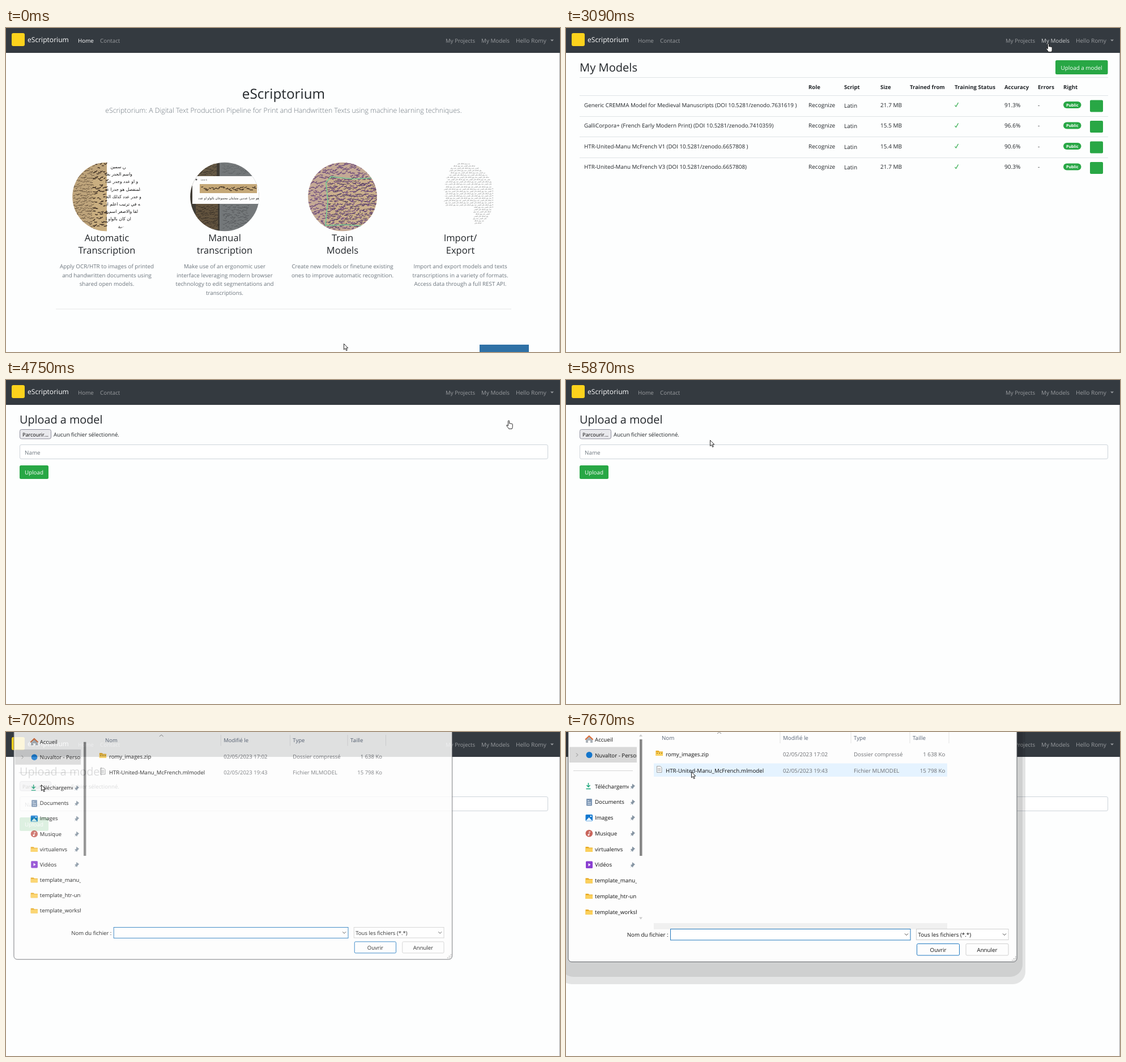
An HTML page that plays this animation: 978x573 px, repeating every 8 s.

```html
<!DOCTYPE html>
<html lang="en">
<head>
<meta charset="utf-8">
<title>Model upload</title>
<style>
html, body { margin: 0; width: 100%; height: 100%; overflow: hidden; background: #fdfefe; }
svg { display: block; width: 978px; height: 573px; font-family: "Open Sans", "Noto Sans", sans-serif; font-size: 9.85px; }
text { white-space: pre; text-rendering: geometricPrecision; }
.ar { font-family: "DejaVu Sans", sans-serif; }
.hide { display: none; }
</style>
</head>
<body>
<svg id="stage" viewBox="0 0 978 573"></svg>
<script>
const INK = '#212529', MUTED = '#6c757d', GREEN = '#28a745', LINK = '#999c9f';

// Markup helpers
const attrs = o => Object.entries(o).map(([k, v]) => `${k}="${v}"`).join(' ');
const text = (x, y, s, o = {}) => `<text x="${x}" y="${y}" ${attrs({ fill: INK, ...o })}>${s}</text>`;
const mid = (x, y, s, o = {}) => text(x, y, s, { 'text-anchor': 'middle', ...o });
const end = (x, y, s, o = {}) => text(x, y, s, { 'text-anchor': 'end', ...o });
const box = (x, y, w, h, fill, o = {}) => `<rect ${attrs({ x, y, width: w, height: h, fill, ...o })}/>`;
const path = (d, o = {}) => `<path ${attrs({ d, fill: 'none', ...o })}/>`;
const dot = (cx, cy, r, fill) => `<circle ${attrs({ cx, cy, r, fill })}/>`;
const group = (body, o = {}) => `<g ${attrs(o)}>${body}</g>`;
const range = n => [...Array(n).keys()];

function randomFrom(seed) {
  return () => (seed = (seed * 16807) % 2147483647) / 2147483647;
}

// Rows of small pen strokes that read as handwriting
function script(x, y, w, h, gap, color, seed, weight = 1) {
  const rnd = randomFrom(seed);
  let d = '';
  for (let row = y; row < y + h; row += gap)
    for (let px = x; px < x + w; px += 2 + rnd() * 3) {
      const dy = (rnd() - .5) * gap * .8;
      d += `M${px.toFixed(1)} ${(row + dy).toFixed(1)}q${(rnd() * 3).toFixed(1)} ${(rnd() * 4 - 1).toFixed(1)} ${(2 + rnd() * 3).toFixed(1)} ${(rnd() * 3 - 2).toFixed(1)}`;
    }
  return path(d, { stroke: color, 'stroke-width': weight, 'stroke-linecap': 'round' });
}

function navbar() {
  return box(0, 0, 978, 44, '#343a40') + box(10, 9, 23, 23, '#fcd21c', { rx: 3 }) +
    text(38, 25, 'eScriptorium', { fill: '#fff', 'font-size': 12.1 }) +
    text(127, 25.5, 'Home', { fill: LINK, id: 'homeLink' }) +
    text(166, 25.5, 'Contact', { fill: LINK }) +
    text(776, 25.5, 'My Projects', { fill: LINK, 'font-size': 9.7 }) +
    text(839, 25.5, 'My Models', { fill: LINK, id: 'modelsLink' }) +
    text(900, 25.5, 'Hello Romy', { fill: LINK, 'font-size': 10.1 }) +
    path('M961 20.5h6l-3 3z', { fill: LINK });
}

const PHRASES = ['بيه فن سمين', 'واسم الجدر بعد', 'واو او عدد وجدر عدد كذلك الجدر', 'المنفصل هو جدرا عددين مس',
  'و جدر عدد كذلك الجدر ثلاثة', 'يه في ترتيب اعلم ان دوات', 'نطقا والاصغر اسم فان كان ج', 'الاول ان كان بالواو الجدر', 'الاحدر خمسة'];

function pictures() {
  const first = box(117, 237, 61, 123, '#bea47b') + box(178, 237, 62, 123, '#fff') +
    box(152, 262, 26, 98, '#c9ae80') + script(119, 241, 34, 118, 6, '#5b4936', 11, .9) +
    script(154, 243, 23, 112, 12, '#3c2d22', 5, 1.4) +
    group(PHRASES.map((s, i) => text(i < 2 ? 226 - i * 3 : 239, 248 + i * 13.2, s,
      { class: 'ar', 'font-size': 7.6, fill: '#111', direction: 'rtl' })).join(''), { 'clip-path': 'url(#rightHalf)' });

  const second = box(325, 237, 52, 123, '#403c35') + box(377, 237, 70, 123, '#74787a') +
    box(340, 240, 32, 24, '#675a46') + box(335, 311, 39, 45, '#62533e') +
    script(336, 316, 36, 38, 5, '#302a24', 7, .8) + script(342, 244, 28, 17, 5, '#39332b', 9, .8) +
    script(382, 244, 50, 16, 6, '#5b5f61', 15, .7) + script(383, 316, 45, 38, 6, '#4d5052', 25, .8) +
    box(329, 262, 118, 49, '#fdfdfd') + box(342, 276, 101, 16, '#c5a878') +
    script(345, 284, 94, 6, 7, '#392b20', 31, 1.2) + dot(336, 268, 1.6, '#555') +
    text(344, 270, 'Line 6', { 'font-size': 4, fill: '#555' }) +
    mid(393, 303, 'هو جدرا عددين متباينان محموعان بالواو او عدد', { class: 'ar', 'font-size': 5.6, fill: '#222' });

  const third = box(533, 237, 122, 123, '#c4a995') + box(566, 265, 89, 84, '#cbb08c') +
    script(534, 241, 120, 119, 8, '#73527f', 43, 1.5) + script(568, 268, 84, 82, 9, '#50405a', 47, 1) +
    path('M652 265L612 267 574 263 565 273 568 306 564 349 600 348 646 351', { stroke: '#78c895', 'stroke-width': 1.7 });

  const fourth = range(27).map(i => {
    const y = 241 + i * 4.05, u = (y - 298) / 61, half = 61 * Math.sqrt(1 - u * u);
    const right = 802 + Math.min(half, 55) - (i < 4 ? 4 : 0);
    const left = i > 18 ? 819 + i % 3 * 3 : 802 - half * .64;
    const words = Math.max(2, Math.round((right - left) / 7.1));
    const line = range(words).map(k => ['عدد', 'كذلك', 'الجدر', 'واو', 'فان'][(k * 3 + i) % 5]).join(' ');
    return text(right, y, line, { class: 'ar', 'font-size': 3.1, fill: '#666', direction: 'rtl' }) +
      (i > 10 && i < 20 ? box(858.5, y - 2, 1.5, 1.5, '#aaa') : '');
  }).join('');

  return [first, second, third, fourth].map((p, i) => group(p, { 'clip-path': `url(#c${i})` })).join('');
}

function home() {
  const columns = [
    ['Automatic', 'Transcription', 'Apply OCR/HTR to images of printed', 'and handwritten documents using', 'shared open models.'],
    ['Manual', 'transcription', 'Make use of an ergonomic user', 'interface leveraging modern browser', 'technology to edit segmentations and', 'transcriptions.'],
    ['Train', 'Models', 'Create new models or finetune existing', 'ones to improve automatic recognition.'],
    ['Import/', 'Export', 'Import and export models and texts', 'transcriptions in a variety of formats.', 'Access data through a full REST API.']];
  return mid(490, 125, 'eScriptorium', { 'font-size': 24.3 }) +
    mid(490, 150, 'eScriptorium: A Digital Text Production Pipeline for Print and Handwritten Texts using machine learning techniques.',
      { 'font-size': 12.25, 'font-weight': 300, fill: MUTED }) +
    pictures() +
    columns.map((lines, c) => lines.map((s, i) => i < 2
      ? mid(178 + c * 208, 377 + i * 22, s, { 'font-size': 16.5 })
      : mid(178 + c * 208, 425 + (i - 2) * 15.7, s, { fill: MUTED })).join('')).join('') +
    box(88, 496.5, 804, 1, '#e6e7e7') + box(836, 560, 87, 13, '#2f71a6');
}

function models() {
  const heads = [[428, 'Role'], [491, 'Script'], [555, 'Size'], [607, 'Trained from'], [686, 'Training Status'],
    [774, 'Accuracy'], [833, 'Errors'], [878, 'Right']];
  const rows = [
    ['Generic CREMMA Model for Medieval Manuscripts (DOI 10.5281/zenodo.7631619 )', '21.7 MB', '91.3%'],
    ['GalliCorpora+ (French Early Modern Print) (DOI 10.5281/zenodo.7410359)', '15.5 MB', '96.6%'],
    ['HTR-United-Manu McFrench V1 (DOI 10.5281/zenodo.6657808 )', '15.4 MB', '90.6%'],
    ['HTR-United-Manu McFrench V3 (DOI 10.5281/zenodo.6657808)', '21.7 MB', '90.3%']];
  const cell = { 'font-size': 10.05 };
  const icons = range(4).map(i => {
    const y = 132 + i * 36.5;
    return path(`M935.5 ${y}h3v4h3l-4.5 4.5-4.5-4.5h3zM931 ${y + 8.5}h3l3 2 3-2h3v3.5h-12z`, { fill: '#fff' });
  }).join('');
  return text(24, 77, 'My Models', { 'font-size': 20.1 }) +
    box(864, 57, 92.5, 25, GREEN, { rx: 2.5, id: 'uploadBtn' }) +
    mid(910, 73.5, 'Upload a model', { fill: '#fff' }) +
    [87, 119, 156, 192, 229].map(y => box(24, y, 933, 1, '#dfe3e6')).join('') +
    heads.map(([x, s]) => text(x, 107.5, s, { 'font-weight': 700, 'font-size': 9.6 })).join('') +
    rows.map(([name, size, score], i) => {
      const y = 139.5 + i * 36.5;
      return text(32, y, name, { 'font-size': 9.8 }) + text(428, y, 'Recognize', cell) + text(491, y + 1, 'Latin', cell) +
        text(555, y, size, cell) + path(`M686.5 ${y - 3}l2 2.5 4-7`, { stroke: GREEN, 'stroke-width': 1.2 }) +
        text(774, y, score, cell) + text(833, y, '-', cell) +
        box(878, y - 9.5, 31.5, 12, GREEN, { rx: 6 }) +
        mid(893.8, y - .8, 'Public', { fill: '#fff', 'font-weight': 700, 'font-size': 7.1 }) +
        box(925, y - 12, 23, 21, GREEN, { rx: 2 });
    }).join('') + group(icons, { id: 'icons' });
}

function upload() {
  return text(24, 77, 'Upload a model', { 'font-size': 19.8 }) +
    box(24.5, 87.5, 55, 16.5, '#e9e9ed', { rx: 3, stroke: '#8f8f9d', id: 'browse' }) +
    mid(52, 99.7, 'Parcourir...', { 'font-size': 9, fill: '#000' }) +
    text(84, 99.7, 'Aucun fichier sélectionné.', { 'font-size': 9.7 }) +
    box(24.5, 114.5, 932, 25, '#fff', { rx: 2.5, stroke: '#ced4da' }) +
    text(33, 131.5, 'Name', { fill: MUTED }) +
    box(24, 151, 51, 24, GREEN, { rx: 2.5 }) + mid(49.5, 166.7, 'Upload', { fill: '#fff' });
}

const folder = (x, y) => path(`M${x} ${y - 4}h5l1.5 1.5h6v7.5h-12.5z`, { fill: '#e8a920' }) + box(x, y - 1.5, 12.5, 6.5, '#fbd05c', { rx: 1 });
const chevron = (x, y) => path(`M${x - 3} ${y - 1.5}l3 3 3-3`, { stroke: '#444' });

function sidebar() {
  const pin = y => path(`M117 ${y - 4.5}l5 4-1.5 1-2 2.5-.5 2-2-2-2.5 2 2-3-1.8-1.5 3-1z`, { fill: '#8695a3' });
  const icons = [
    path('M36 96v-5', {}) + path('M39.5 90v7m-3-3l3 3.2 3-3.2M35.5 100.5h8', { stroke: '#1aa67a', 'stroke-width': 1.4 }),
    box(36, 118, 10, 12.5, '#7e97b5', { rx: 1 }) + path('M38 121.5h3m-3 3h6m-6 3h6', { stroke: '#e4edf6' }),
    box(34.5, 146, 12.5, 11.5, '#1479d0', { rx: 1.5 }) + path('M35 157l5.5-6 6 6z', { fill: '#e5f3ff' }) + dot(44, 149, 1.2, '#fff'),
    dot(40.8, 179.3, 6.3, '#c9655c') + path('M41 182v-6l2.5 1.2', { stroke: '#fff' }) + dot(39.8, 182, 1.5, '#fff'),
    folder(34.5, 207),
    box(35, 228.5, 12, 12.5, '#8a3fd1', { rx: 1.5 }) + path('M39.5 232v5.5l4-2.7z', { fill: '#fff' }),
    folder(34.5, 262.5), folder(34.5, 290), folder(34.5, 318)];
  const names = ['Téléchargements', 'Documents', 'Images', 'Musique', 'virtualenvs', 'Vidéos', 'template_manu_', 'template_htr-united', 'template_workshop'];
  const items = names.map((s, i) => {
    const y = 96 + i * 27.75;
    return icons[i] + group(text(51, y + 3.5, s, { fill: '#111', 'font-size': 9.7 }), { 'clip-path': i ? 'url(#side)' : 'url(#sidePin)' }) + (i < 6 ? pin(y) : '');
  }).join('');
  return box(6, 26.5, 119, 27.5, '#d9d9d9') + box(6, 82, 119, 27.5, '#e5f3fd', { id: 'sideHover' }) +
    path('M35 13l6-5.5 6 5.5v6h-4v-4h-4v4h-4z', { fill: '#aab1b8' }) + path('M34 13.5l6.8-6.5 6.8 6.5', { stroke: '#dd6a32', 'stroke-width': 1.8 }) +
    text(51, 16.5, 'Accueil', { fill: '#111', 'font-size': 9.7 }) +
    path('M18 37.5l3 3-3 3', { stroke: '#888' }) + dot(41, 40.5, 5.5, '#1476cc') +
    group(text(51, 44.5, 'Nuvaltor - Personnel', { fill: '#111', 'font-size': 9.7 }), { 'clip-path': 'url(#side)' }) +
    box(13, 68, 105, 1, '#d6d6d6') + items + box(130, 13, 4.5, 206, '#868686') +
    path('M129 8l3-4 3 4zM129 327.5h6l-3 4z', { fill: '#ccc', id: 'scrollTips' });
}

function dialog() {
  const gray = { fill: '#6d6f73', 'font-size': 9.75 }, dark = { fill: '#111', 'font-size': 9.75 };
  const file = (y, name, date, kind, size) => text(176, y, name, dark) + text(383, y, date, gray) + text(508, y, kind, gray) + end(669.5, y, size, gray);
  const shadow = box(-12, -20, 823, 466, '#000', { rx: 22, opacity: .1 }) +
    box(-9, -20, 815, 453, '#000', { rx: 22, opacity: .09 });
  return group(shadow, { id: 'shadow' }) +
    box(4, -30, 792, 436.5, '#fdfdfd', { rx: 6, stroke: '#63666a' }) + sidebar() +
    [[169, 'Nom'], [383, 'Modifié le'], [508, 'Type'], [612, 'Taille']].map(([x, s]) => text(x, 13.5, s, { fill: '#596577', 'font-size': 9.75 })).join('') +
    [377.5, 502.5, 606.5, 675.5].map(x => box(x, 0, 1, 20, '#e4e4e4')).join('') +
    path('M267 3l3.5-3 3.5 3', { stroke: '#888' }) +
    group(box(155, 55.5, 518, 23.5, '#e5f3ff') + box(155, 338, 518, 11, '#f0f0f0'), { id: 'rowHover' }) +
    folder(158.5, 37) + path('M160 37.5h10', { stroke: '#81651b', 'stroke-dasharray': 2 }) +
    path('M160.5 60.5h6l2.5 2.5v8.5h-8.5z', { fill: '#f7f7f7', stroke: '#8d8d8d', 'stroke-width': .8 }) +
    path('M162 64.5h5m-5 2h5m-5 2h5', { stroke: '#999', 'stroke-width': .7 }) +
    file(43, 'romy_images.zip', '02/05/2023 17:02', 'Dossier compressé', '1 638 Ko') +
    file(71.5, 'HTR-United-Manu_McFrench.mlmodel', '02/05/2023 19:43', 'Fichier MLMODEL', '15 798 Ko') +
    end(180.5, 362, 'Nom du fichier :', dark) +
    box(184.5, 348.5, 423.5, 19.5, '#fff', { stroke: '#2379bd' }) + chevron(601, 358) +
    box(187.5, 351, 1, 14, '#000', { id: 'caret' }) +
    box(618.5, 348.5, 162.5, 19, '#fff', { stroke: '#d0d0d0' }) + text(621.5, 362, 'Tous les fichiers (*.*)', dark) + chevron(774, 358) +
    box(619.5, 374.5, 75, 20.5, '#fdfdfd', { rx: 2, stroke: '#1f78c1' }) + mid(657, 388.5, 'Ouvrir', dark) +
    box(706, 374.5, 75, 20.5, '#fdfdfd', { rx: 2, stroke: '#d0d0d0' }) + mid(743.5, 388.5, 'Annuler', dark) +
    range(6).map(i => box([793, 790, 793, 787, 790, 793][i], [397, 400, 400, 403, 403, 403][i], 1.6, 1.6, '#aaa')).join('');
}

const clip = (id, body) => `<clipPath id="${id}">${body}</clipPath>`;
const stage = document.getElementById('stage');
stage.innerHTML = '<defs>' + range(4).map(i => clip('c' + i, dot(178 + i * 208, 298.5, 60.8, '#000'))).join('') +
  clip('rightHalf', box(176, 237, 64, 123, '#000')) + clip('side', box(0, 0, 125, 340, '#000')) + clip('sidePin', box(0, 0, 110.5, 340, '#000')) + '</defs>' +
  box(0, 0, 978, 573, '#fdfefe') + box(977, 44, 1, 529, '#a3a5a6') + navbar() +
  group(home(), { id: 'home' }) + group(models(), { id: 'models' }) + group(upload(), { id: 'upload' }) + group(dialog(), { id: 'dialog' }) +
  path('M.5 .5V10.8L2.9 8.6 4.7 12.6 6.3 11.9 4.6 8H7.8Z', { id: 'arrow', fill: '#fff', stroke: '#111', 'stroke-width': .9 }) +
  path('M3.4 10V1.8a1.1 1.1 0 0 1 2.2 0V6.1a1 1 0 0 1 1.9.3 1 1 0 0 1 1.9.4 1 1 0 0 1 1.8.7V11.5q0 2-1 3.8H4.6Q4 13.8.8 10 .4 8.3 2 8.8Z',
    { id: 'hand', fill: '#fff', stroke: '#111', 'stroke-width': .9 });

// time, page, cursor, x, y, active parts
const STEPS = [
  [0, 'home', 'arrow', 596, 558], [1270, 'home', 'arrow', 618, 480], [1390, 'home', 'arrow', 660, 330],
  [1510, 'home', 'arrow', 685, 230], [1660, 'home', 'arrow', 695, 199], [1910, 'home', 'arrow', 765, 72],
  [2030, 'home', 'arrow', 817, 3], [2180, 'home', 'hand', 840, 22, 'link'], [2300, 'home', 'hand', 847, 27, 'link'],
  [3090, 'models', 'hand', 847, 27, 'link'], [3340, 'models', 'hand', 847, 27, 'link icons'],
  [3750, 'models', 'arrow', 866, 58, 'icons'], [3900, 'models', 'hand', 880, 69, 'icons hover'],
  [4020, 'models', 'hand', 883, 71, 'icons hover'], [4630, 'models', 'hand', 883, 71, 'icons hover focus'],
  [4750, 'upload', 'hand', 883, 71], [4880, 'upload', 'arrow', 887, 72], [5290, 'upload', 'arrow', 640, 85],
  [5410, 'upload', 'arrow', 454, 91], [5560, 'upload', 'arrow', 397, 83], [5870, 'upload', 'arrow', 254, 106],
  [6020, 'upload', 'arrow', 196, 107], [6140, 'upload', 'arrow', 145, 105], [6260, 'upload', 'arrow', 104, 101],
  [6380, 'upload', 'arrow', 78, 97, 'browse'], [6510, 'upload', 'arrow', 67, 94, 'browse'], [6630, 'upload', 'arrow', 62, 93, 'browse'],
  [7020, 'upload', 'arrow', 62, 93, 'browse dialog opening'], [7170, 'upload', 'hand', 62, 94, 'dialog side caret'],
  [7550, 'upload', 'arrow', 150, 83, 'dialog tips'], [7670, 'upload', 'arrow', 221, 70, 'dialog tips row']];

const el = id => document.getElementById(id);
const show = (id, on) => el(id).classList.toggle('hide', !on);
const paint = (id, o) => Object.entries(o).forEach(([k, v]) => el(id).setAttribute(k, v));
let shown;

function frame() {
  const t = performance.now() % 8000;
  const step = STEPS.findLast(s => s[0] <= t);
  if (step !== shown) render(shown = step);
  requestAnimationFrame(frame);
}

function render([, page, cursor, x, y, parts = '']) {
  const has = new Set(parts.split(' '));
  for (const id of ['home', 'models', 'upload']) show(id, id === page);
  for (const id of ['arrow', 'hand']) show(id, id === cursor);
  for (const [id, part] of [['icons', 'icons'], ['dialog', 'dialog'], ['sideHover', 'side'], ['caret', 'caret'],
    ['scrollTips', 'tips'], ['rowHover', 'row']]) show(id, has.has(part));
  paint(cursor, { transform: `translate(${x} ${y})` });
  paint('homeLink', { fill: page === 'home' ? '#fff' : LINK });
  paint('modelsLink', { fill: has.has('link') ? '#cccecf' : LINK });
  paint('uploadBtn', { fill: has.has('hover') ? '#218838' : GREEN, stroke: has.has('focus') ? '#93d9a2' : 'none', 'stroke-width': 2 });
  paint('browse', { fill: has.has('browse') ? '#d0d0d7' : '#e9e9ed' });
  const opening = has.has('opening');
  paint('dialog', { transform: opening ? 'translate(10 5) scale(.977)' : '', opacity: opening ? .85 : 1 });
  show('shadow', !opening);
}
frame();
</script>
</body>
</html>
```
